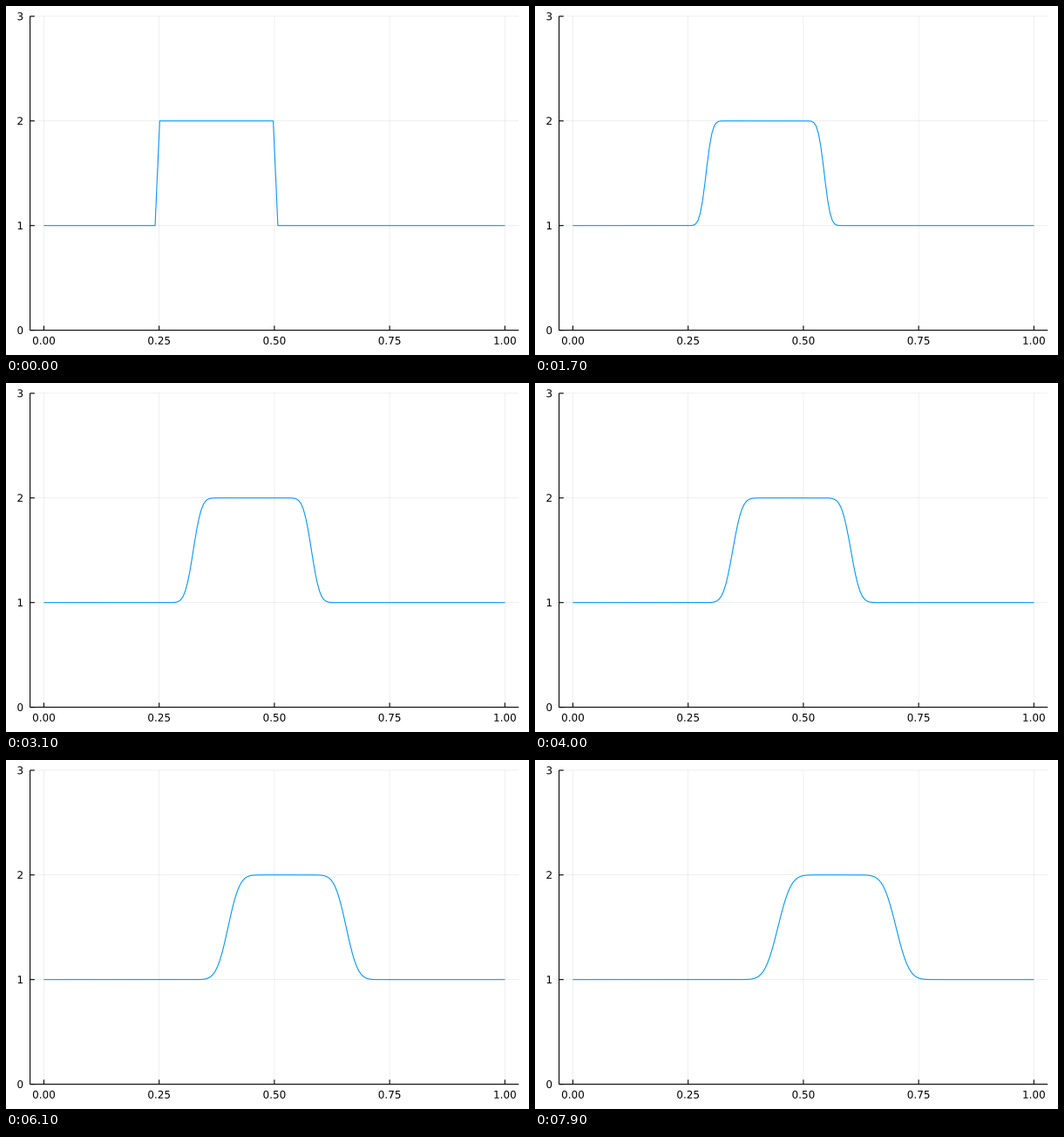
Write a matplotlib script that moves like this. It is 600 px wide and 400 px high and loops after 8 s.

```python
import numpy as np
import matplotlib.pyplot as plt
from matplotlib.animation import FuncAnimation
from matplotlib.patches import PathPatch
from matplotlib.textpath import TextPath
from matplotlib.transforms import Affine2D

W, H, DPI = 600, 400, 100
PX = 72 / DPI  # points per pixel
FRAMES, INTERVAL = 80, 100
NODES, COURANT = 200, 0.5

LEFT, RIGHT, TOP, BOTTOM = 27.6, 588.2, 11.8, 371.6
PAD = 0.03  # empty share on each side of the unit x range
SPAN = (RIGHT - LEFT) / (1 + 2 * PAD)

EM = 12
DIGIT, POINT, CAP = 0.636 * EM, 0.318 * EM, 0.729 * EM


def px(x):
    return LEFT + SPAN * (x + PAD)


def py(y):
    return BOTTOM - (BOTTOM - TOP) * y / 3


def upwind_states():
    """Advect a square pulse with the first-order upwind scheme."""
    u = np.ones(NODES)
    u[49:100] = 2
    states = []
    for _ in range(FRAMES):
        u[1:] -= COURANT * (u[1:] - u[:-1])
        states.append(u.copy())
    return states


fig = plt.figure(figsize=(W / DPI, H / DPI), dpi=DPI, facecolor="white")
ax = fig.add_axes([0, 0, 1, 1])
ax.set(xlim=(0, W), ylim=(H, 0))
ax.axis("off")


def stroke(xs, ys, width, **style):
    return ax.plot(xs, ys, lw=width * PX, solid_capstyle="butt",
                   snap=False, **style)[0]


def label(x, y, text):
    """Draw text as outlines, its left end at x and its middle at y."""
    place = Affine2D().scale(1, -1).translate(x, y + CAP / 2)
    glyphs = TextPath((0, 0), text, size=EM, prop={"family": "DejaVu Sans"})
    ax.add_patch(PathPatch(place.transform_path(glyphs), fc="black", lw=0,
                           snap=False))


grid = dict(color="black", alpha=0.1, zorder=1)
axis = dict(color="black", zorder=3)

for v in np.linspace(0, 1, 5):
    x = px(v)
    stroke([x, x], [TOP, BOTTOM], 0.6, **grid)
    stroke([x, x], [BOTTOM, BOTTOM - 5.2], 1.1, **axis)
    label(x - (3 * DIGIT + POINT) / 2, 383.4, f"{v:.2f}")

for v in range(4):
    y = py(v)
    stroke([LEFT, RIGHT], [y, y], 0.6, **grid)
    stroke([LEFT, LEFT + 5.2], [y, y], 1.1, **axis)
    label(20.1 - DIGIT, y, str(v))

stroke([LEFT, RIGHT], [BOTTOM, BOTTOM], 1.1, **axis)
stroke([LEFT, LEFT], [TOP, BOTTOM], 1.1, **axis)

states = upwind_states()
curve = stroke(px(np.linspace(0, 1, NODES)), py(states[0]), 1.1,
               color="#009afa", zorder=4)


def draw(i):
    curve.set_ydata(py(states[i]))
    return (curve,)


anim = FuncAnimation(fig, draw, frames=FRAMES, interval=INTERVAL,
                     repeat=True, repeat_delay=0)
plt.show()
```
